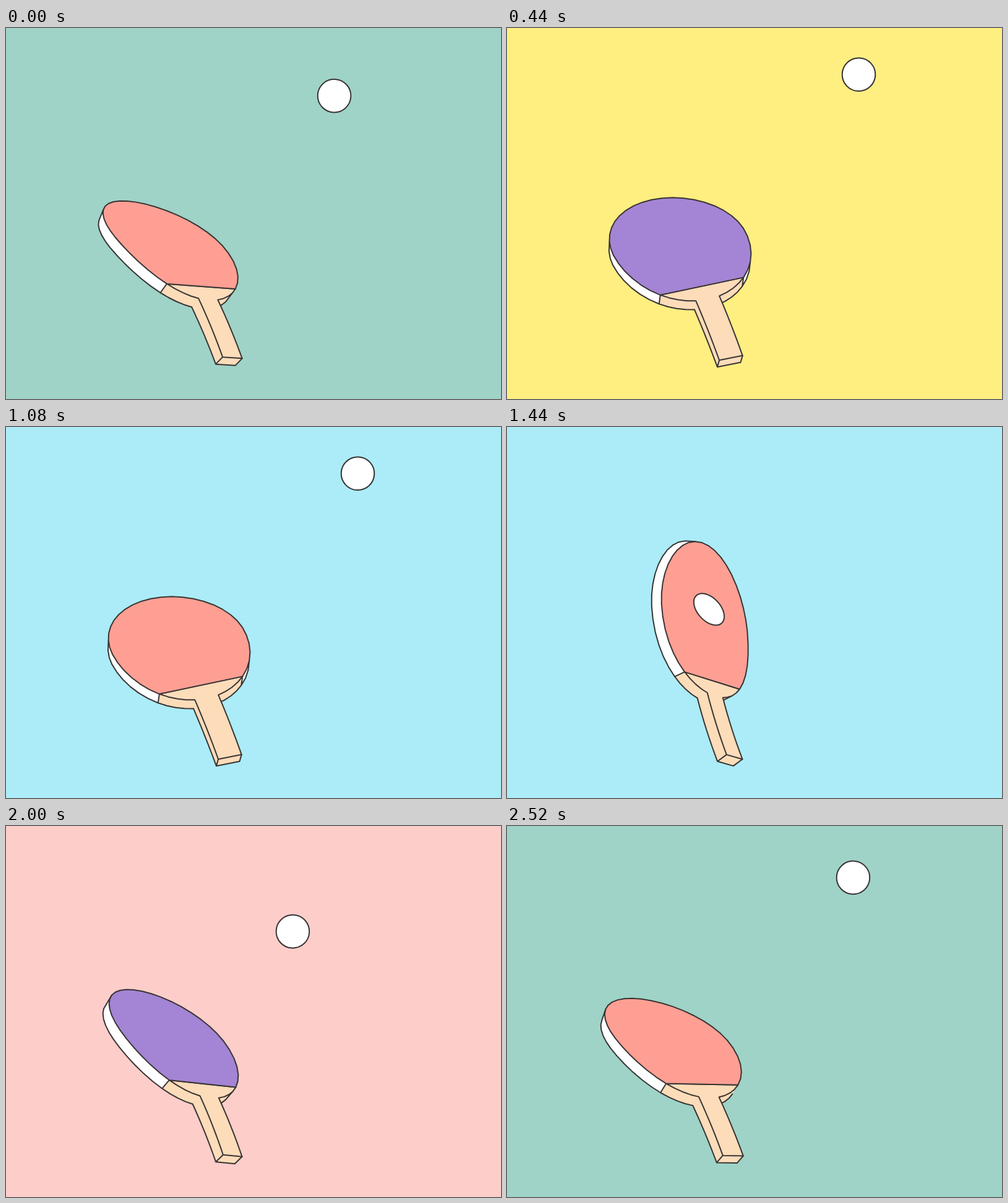
An HTML page that plays this animation: 800x600 px, repeating every 2560 ms.

```html
<!DOCTYPE html>
<html>
<head>
<meta charset="utf-8">
<title>Table tennis</title>
<style>
html, body { margin: 0; height: 100%; overflow: hidden; }
svg { display: block; width: 800px; height: 600px; }
path, ellipse { stroke-linejoin: round; stroke-linecap: round; }
.line { fill: none; }
.ink { stroke: #383434; stroke-width: 2; }
</style>
</head>
<body>
<svg viewBox="0 0 800 600">
  <rect id="bg" width="800" height="600"/>
  <path id="rim" fill="#fff"/>
  <path id="neck" fill="#fddcb9"/>
  <path id="headLines" class="line ink"/>
  <path id="grip" fill="#fddcb9"/>
  <path id="gripLines" class="line ink"/>
  <path id="wood" class="ink" fill="#fddcb9"/>
  <path id="rubber" class="ink"/>
  <ellipse id="ball" class="ink" fill="#fff"/>
</svg>
<script>
const el = id => document.getElementById(id);
const FRAME = 40, BEAT = 640, LOOP = 4 * BEAT;
const SWING = 220, HIT = 360;   // within a beat: back-swing ends, ball is struck
const GROUNDS = ['#9fd3c7', '#ffee80', '#abecf8', '#fdcdc9'];
const RUBBERS = ['#ff9f93', '#a484d4'];
const BUTT = [360.3, 539];

// spin about the handle; x, y of the blade's chord; lean and length of the blade;
// bow of its axis; direction and size of its thickness at chord and tip
const REST = { spin: -1, x: 314, y: 424.8, lean: 30, len: 160, bowX: 3, bowY: -1,
  chordDir: 98, chord: 14.6, tipDir: 90, tip: 17 };
const WOUND = { spin: 24.6, x: 310, y: 425, lean: 41, len: 180, bowX: 8, bowY: -3,
  chordDir: 126.8, chord: 17.9, tipDir: 110.5, tip: 19.4 };
const STRUCK = { spin: 37.5, x: 323.5, y: 413.8, lean: 4.2, len: 228, bowX: -4, bowY: 11,
  chordDir: 155, chord: 17.7, tipDir: 183.6, tip: 16 };
const FLIPPED = { ...REST, spin: REST.spin + 180,
  chordDir: REST.chordDir + 180, tipDir: REST.tipDir + 180 };

const add = (a, b, k = 1) => [a[0] + b[0] * k, a[1] + b[1] * k];
const mul = (a, k) => [a[0] * k, a[1] * k];
const cross = (a, b) => a[0] * b[1] - a[1] * b[0];
const mix = (a, b, k) => add(a, add(b, a, -1), k);
const polar = (deg, r) => [r * Math.cos(deg * Math.PI / 180), r * Math.sin(deg * Math.PI / 180)];
const line = pts => 'M' + pts.map(p => p[0].toFixed(2) + ' ' + p[1].toFixed(2)).join('L');
const ramp = (t, a, b) => Math.min(1, Math.max(0, (t - a) / (b - a)));
const smooth = x => x * x * (3 - 2 * x);
const easeOut = (x, k) => 1 - (1 - x) ** k;

function poseAt(s) {
  const [a, b, k] =
    s < SWING ? [REST, WOUND, smooth(s / SWING)] :
    s < HIT ? [WOUND, STRUCK, ramp(s, SWING, HIT) ** 2.4] :
    [STRUCK, FLIPPED, easeOut(ramp(s, HIT, BEAT), 2)];
  const pose = {};
  for (const key in a) pose[key] = a[key] + (b[key] - a[key]) * k;
  return pose;
}

// Egg-shaped blade, angle measured from the tip
const CHORD = 2.446, NECK = 2.96;
const egg = a => [1.56 * Math.sin(a), 0.485 + (Math.cos(a) > 0 ? 0.515 : 0.632) * Math.cos(a)];
const arc = (a, b, n) => Array.from({ length: n + 1 }, (_, i) => egg(a + (b - a) * i / n));

function drawPaddle(s, n) {
  const pose = poseAt(s);
  const [c, z] = polar(pose.spin, 1);
  const turn = (a, b) => [a[0] * c + b[0] * z, a[1] * c + b[1] * z];
  const base = [pose.x, pose.y], bow = [pose.bowX, pose.bowY];
  const axis = polar(-90 - pose.lean, pose.len);
  let half = turn([67, -13.5], [-14.3, 40.5]);
  const side = cross(half, axis) < 0 ? 1 : -1;   // which face is seen
  half = mul(half, side);
  const width = mul(turn([37.5, -7], [-6.7, 21.2]), side);
  const dButt = mul(turn([-3.5, 11], [-19.5, 3.6]), side);
  const dChord = polar(pose.chordDir, pose.chord * side);
  const dTip = polar(pose.tipDir, pose.tip * side);

  // k is -0.5 on the front face and 0.5 on the back
  const blade = ([u, v], k) => {
    let p = add(add(base, axis, v), bow, 4 * v * (1 - v));
    p = add(p, half, u);
    return add(p, mix(dChord, dTip, v), k);
  };
  const neckV = egg(NECK)[1];
  const down = mul(add(axis, bow, 4 * (1 - 2 * neckV)), -1);
  const handle = (dir, k) => {
    const top = blade(egg(NECK * dir), k);
    const foot = add(add(BUTT, width, dir / 2), dButt, k);
    const reach = Math.hypot(...add(foot, top, -1)) / 2 / Math.hypot(...down);
    const ctrl = mix(mix(top, foot, 0.5), add(top, down, reach), 0.6);
    return Array.from({ length: 9 }, (_, i) =>
      mix(mix(top, ctrl, i / 8), mix(ctrl, foot, i / 8), i / 8));
  };
  const face = k => {
    const at = p => blade(p, k);
    return {
      left: arc(-NECK, -CHORD, 4).map(at),
      rim: arc(-CHORD, CHORD, 32).map(at),
      right: arc(CHORD, NECK, 4).map(at),
      grip: [...handle(1, k), ...handle(-1, k).reverse()]
    };
  };
  const front = face(-0.5), back = face(0.5);

  // Sides that face the viewer, with their outer edges and creases
  const wall = (part, creases) => {
    const f = front[part], b = back[part], last = f.length - 1;
    const seen = [];
    let fill = '', ink = '';
    for (let i = 0; i < last; i++) {
      const along = add(f[i + 1], f[i], -1);
      const depth = add(mix(b[i], b[i + 1], 0.5), mix(f[i], f[i + 1], 0.5), -1);
      seen[i] = cross(along, depth) < 0;
      if (!seen[i]) continue;
      fill += line([f[i], f[i + 1], b[i + 1], b[i]]) + 'Z';
      ink += line([b[i], b[i + 1]]);
    }
    for (let i = 0; i <= last; i++) {
      const before = !!seen[i - 1], after = !!seen[i];
      const inner = i > 0 && i < last;
      if ((inner && before !== after) || (creases.includes(i) && (before || after)))
        ink += line([f[i], b[i]]);
    }
    return { fill, ink };
  };
  const rim = wall('rim', [0, 32]);
  const left = wall('left', []), right = wall('right', []);
  const grip = wall('grip', [8, 9]);
  const put = (id, d) => el(id).setAttribute('d', d);
  put('rim', rim.fill);
  put('neck', left.fill + right.fill);
  put('headLines', rim.ink + left.ink + right.ink);
  put('grip', grip.fill);
  put('gripLines', grip.ink);
  put('wood', line([...front.left, ...front.right, ...front.grip]) + 'Z');
  put('rubber', line(front.rim) + 'Z');
  el('rubber').setAttribute('fill', RUBBERS[(n + (side < 0 ? 1 : 0)) % 2]);
}

// The ball rises to its peak, drifts back, then drops onto the blade
function ballDrop(s) {
  const rise = t => 248.5 * (1 - easeOut(ramp(t, HIT, HIT + 380), 2.73));
  if (s > HIT) return rise(s);
  const fall = 60 * smooth(ramp(s, 120, 240)) + 188.5 * ramp(s, SWING, HIT) ** 1.53;
  return fall + rise(s + BEAT);
}

function drawBall(s) {
  const drop = ballDrop(s), hit = s === HIT;
  const ball = el('ball');
  ball.setAttribute('rx', hit ? 30.3 : 26.8);
  ball.setAttribute('ry', hit ? 18.5 : 26.8);
  ball.setAttribute('transform', `translate(${575 - drop} ${69.3 + drop * 0.908}) rotate(47.5)`);
}

function draw(ms) {
  const t = Math.floor(ms % LOOP / FRAME) * FRAME;
  const beat = t + 200, n = Math.floor(beat / BEAT), s = beat % BEAT;
  el('bg').setAttribute('fill', GROUNDS[Math.floor((t + 440) / BEAT) % 4]);
  drawPaddle(s, n);
  drawBall(s);
}

let start = null;
function tick(now) {
  if (start === null) start = now;
  draw(Math.max(0, now - start));
  requestAnimationFrame(tick);
}
draw(0);
requestAnimationFrame(tick);
</script>
</body>
</html>
```
